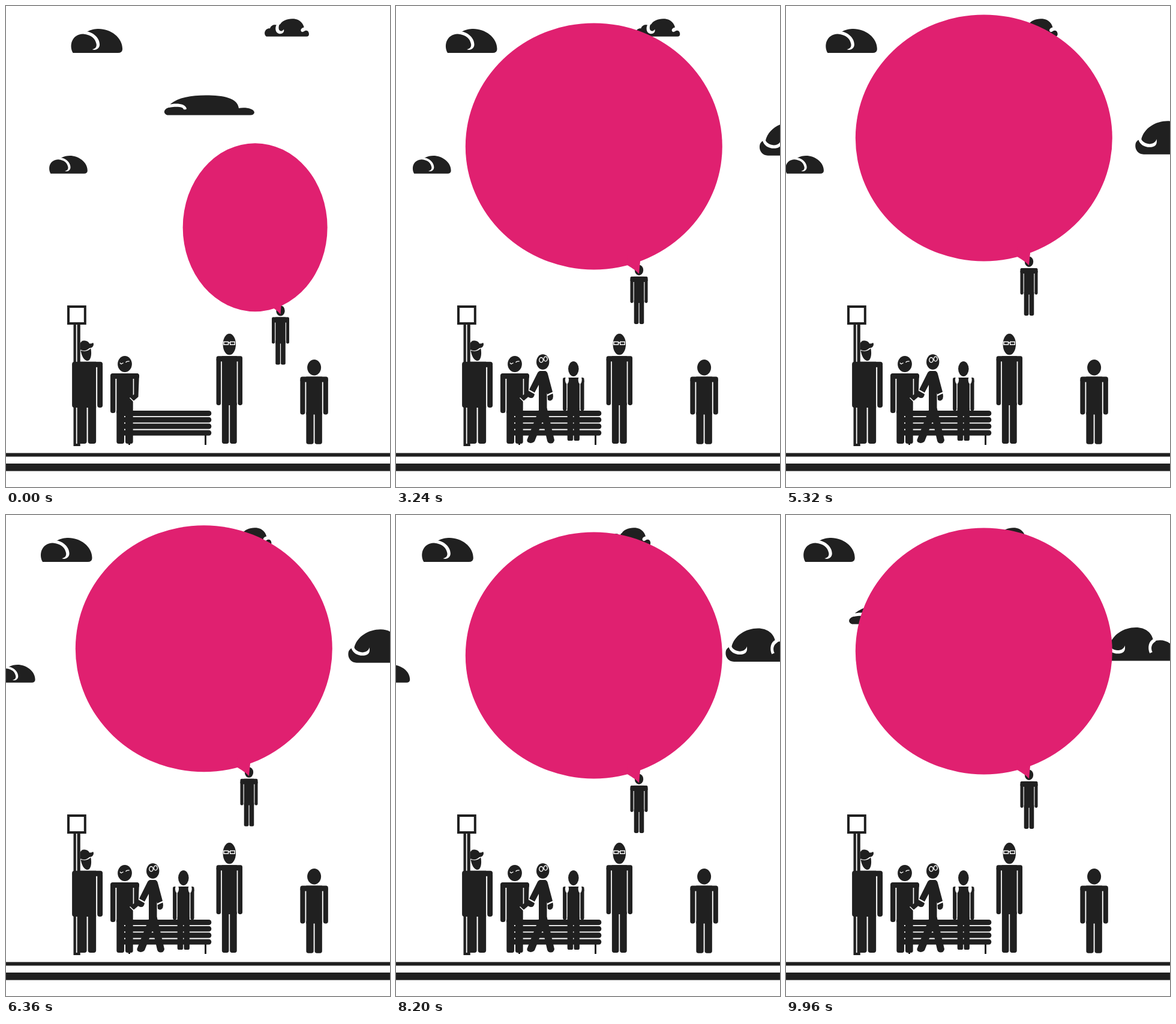
An HTML page that plays this animation: 640x800 px, repeating every 10 s.

```html
<!DOCTYPE html>
<html lang="en">
<head>
<meta charset="utf-8">
<title>Balloon</title>
<style>
html, body { margin: 0; width: 100%; height: 100%; overflow: hidden; background: #fff; }
svg { display: block; fill: #202020; }
.w { fill: #fff; }
.l { fill: none; stroke: #fff; stroke-width: 1.4; }
</style>
</head>
<body>
<svg width="640" height="800" viewBox="0 0 640 800">
  <defs>
    <g id="shell">
      <path d="M3 40C-4 28 1 9 20 8.5L26 5C33 1 40 0 46 0C65 0 86 14 85.5 34Q85 40 78 40Z"/>
      <path class="w" d="M23 4C38 5 47.5 16 47.5 26C47.5 33 40 37 35 34C40 33.5 43 30 42 25C40 16 34 10 20 8.5Z"/>
    </g>
  </defs>

  <g transform="translate(108.6 38)"><g data-speed="8"><use href="#shell"/></g></g>
  <g transform="translate(430 21.3)"><g data-speed="9.9">
    <path d="M4 29.5C-2 25 2 15 10 16C12 10 18 9 23 11L27 9C32 1 42 0 50 0C60 1 66 8 67 16V20Q74 18 75 25Q75 29.5 71 29.5Z"/>
    <path class="w" d="M22 8C17 15 19 25 27 25C32 25 34 21 33 17.5C30 22 25 21 24.5 16Q24 12 27 7Z"/>
    <path class="w" d="M69 14C63 14 60 18 62 21C65 23.5 67 20 70 19Z"/>
  </g></g>
  <g transform="translate(263 148)"><g data-speed="16">
    <path d="M6 33.5C-2 31 -1 22 12 20L11 15C25 4 45 .5 70 .5C100 .5 123 5 125 22C135 20 150 22 151 29Q150 33.5 144 33.5Z"/>
    <path class="w" d="M8 16C18 13.5 36 13 38 23Q37 25 33 24C32 19 20 19 4 21.5Z"/>
  </g></g>
  <g transform="translate(72.1 249)"><g data-speed="13.8"><use href="#shell" transform="scale(.745)"/></g></g>
  <g transform="translate(642.3 196.3)"><g data-speed="11.4" data-rise=".95">
    <path d="M14 55.5C3 55 -2 45 1 36Q4 30 10 31C14 12 34 0 54 0C70 0 80 9 82.5 20L83 24C100 16 122 28 121 48Q120 55.5 112 55.5Z"/>
    <path class="w" d="M5 30C8 42 20 45 29 43C37 41 36 34 35.5 30C34 37 25 40 18 37C13 35 10 32 9 27Z"/>
    <path class="w" d="M84 19C75 22 73 34 77 43L81.5 41C78 34 80 27 87 23Z"/>
  </g></g>

  <path d="M0 743.5H640V749.5H0ZM0 761H640V773.5H0Z"/>
  <path d="M112.5 528H116.8V732H112.5ZM118.6 528H123.8V732H118.6ZM112.5 728H123.8V732H112.5Z"/>
  <rect x="104" y="500" width="27.8" height="28" fill="#fff" stroke="#202020" stroke-width="4"/>

  <g id="bench"><path d="M204 712H207V730H204ZM331 712H334V730H331Z"/></g>

  <g id="cap">
    <path d="M123.5 571.5V562Q125 556 131 556.5Q137 557 139 561.5Q143 562 145 560Q147 562 145 566Q143 569 139 569Q134 574 128 573Z"/>
    <path d="M124.5 573Q134 576.5 141.3 569.5C143.5 580 141 590 136 590C130 590 126 582 124.5 573Z"/>
    <path d="M117 601H122V668H117Z"/>
  </g>

  <g id="squint">
    <path class="l" d="M190 593.5L192 595.5L195.5 593.5M199.5 593Q201 590.5 205.5 591"/>
    <path d="M210 611H217Q222 611 221.8 616L220.5 650L213 656.5L206.5 651L213.3 646V620H210Z"/>
    <path class="l" d="M206.5 651.5L212.5 657.5"/>
  </g>

  <g id="specs">
    <path class="l" d="M363 558.5H370.5V563.3H363ZM373.7 558.5H381.2V563.3H373.7ZM370.5 560H373.7"/>
  </g>
  <g id="plain"></g>

  <g id="walker">
    <ellipse cx="244.7" cy="592" rx="10.7" ry="12.7"/>
    <ellipse class="l" cx="242" cy="588.7" rx="3.2" ry="4"/>
    <ellipse class="l" cx="249.3" cy="587" rx="3" ry="3.8"/>
    <path d="M240 607H249Q252 608 253 612L261 642L252 646L251.5 643V668L264 722Q263 728 257 727.5Q253 727 252 723L244.5 690L231 724Q227 728.5 221 726Q217 724 219 720L238 672V630L231 643L222 638L236 610Q238 607 240 607Z"/>
    <path d="M221 640L231 645.5Q230 653 224 652Q217 650 218 643Z"/>
    <path d="M252.5 648.5L261.3 644.5Q263 652 260 655Q256 658 253 655Z"/>
  </g>

  <g id="sitter">
    <ellipse class="w" cx="285" cy="622" rx="3" ry="6.5"/>
    <ellipse class="w" cx="306.7" cy="622" rx="3" ry="6.5"/>
  </g>

  <g id="flyer"></g>
  <g id="balloon" fill="#e02070">
    <ellipse cx="-75.2" cy="-212" rx="214" ry="205"/>
    <path d="M0 0Q-5 -6 -19.5 -14.5L-20 -30H3L1.9 -20Z"/>
  </g>
</svg>
<script>
const $ = id => document.getElementById(id);
const mix = (a, b, p) => a + (b - a) * p;
const ramp = (t, from, to) => Math.min(1, Math.max(0, (t - from) / (to - from)));
const under = (id, shapes) => { $(id).innerHTML = shapes + $(id).innerHTML; };

const box = (left, top, right, bottom, r = 0) =>
  `<rect x="${left}" y="${top}" width="${right - left}" height="${bottom - top}" rx="${r}"/>`;

// Upright figure; every width follows from the shoulder width w
function person(id, { x, w, crown, top, hip, feet, rightArm = true }) {
  const arm = w * .175, slit = w * .02, r = w * .08;
  const half = w / 2, inner = half - arm - slit * 2;
  const side = s => {
    const span = (a, b) => [x + Math.min(s * a, s * b), x + Math.max(s * a, s * b)];
    const [armL, armR] = span(half - arm, half);
    const [legL, legR] = span(slit, inner);
    const limb = s < 0 || rightArm ? box(armL, top + 3, armR, hip, r) : "";
    return limb + box(legL, hip - 6, legR, feet, r);
  };
  const head = crown
    ? `<ellipse cx="${x}" cy="${(crown + top - 2) / 2}" rx="${w * .247}" ry="${(top - 2 - crown) / 2}"/>`
    : "";
  under(id, head + side(-1) + side(1) +
    box(x - half, top, x + half, top + 9, r) +
    box(x - inner, top, x + inner, hip));
}

person("cap", { x: 135.6, w: 51, top: 591.7, hip: 668, feet: 728 });
person("squint", { x: 198, w: 48, crown: 582, top: 611, hip: 677, feet: 728, rightArm: false });
person("specs", { x: 372.3, w: 43.5, crown: 545, top: 582.3, hip: 664, feet: 728 });
person("plain", { x: 513.6, w: 46.5, crown: 588, top: 616.5, hip: 679.5, feet: 728.7 });
person("sitter", { x: 295.8, w: 35.5, crown: 591, top: 618, hip: 673, feet: 723 });
person("flyer", { x: 457.5, w: 29, crown: 498, top: 517.5, hip: 561.5, feet: 596.5 });

for (let y = 673; y < 710; y += 10.8) under("bench", box(194, y, 342.3, y + 9, 4.3));

const clouds = document.querySelectorAll("[data-speed]");

function popIn(el, cx, cy, p) {
  el.setAttribute("opacity", p);
  el.setAttribute("transform", `translate(${cx} ${cy}) scale(${mix(.55, 1, p)}) translate(${-cx} ${-cy})`);
}

// Triangle wave: 15 steps down, 15 up, one at rest
function bob(t) {
  const step = Math.floor(Math.max(0, t - 2800) / 40) % 31;
  return 1.4 * Math.max(0, 15 - Math.abs(step - 15));
}

function draw(now) {
  const t = now % 10000;
  const slow = Math.floor(t / 80) * 80;

  for (const el of clouds) {
    const { speed, rise = 0 } = el.dataset;
    el.setAttribute("transform", `translate(${-speed * slow / 1000} ${-rise * slow / 1000})`);
  }

  const first = ramp(slow, 0, 1120);
  popIn($("walker"), 241, 653.5, first);
  popIn($("sitter"), 295.8, 657, ramp(slow, 1200, 2320));

  const lift = ramp(slow, 1200, 2720);
  const x = -52.5 * lift, y = -83 * lift + bob(t);
  $("flyer").setAttribute("transform", `translate(${x} ${y})`);
  $("balloon").setAttribute("transform",
    `translate(${457.5 + x} ${513 + y}) scale(${mix(.563, 1, first)} ${mix(.683, 1, first)})`);
}

const start = performance.now();
(function tick() {
  draw(performance.now() - start);
  requestAnimationFrame(tick);
})();
</script>
</body>
</html>
```
